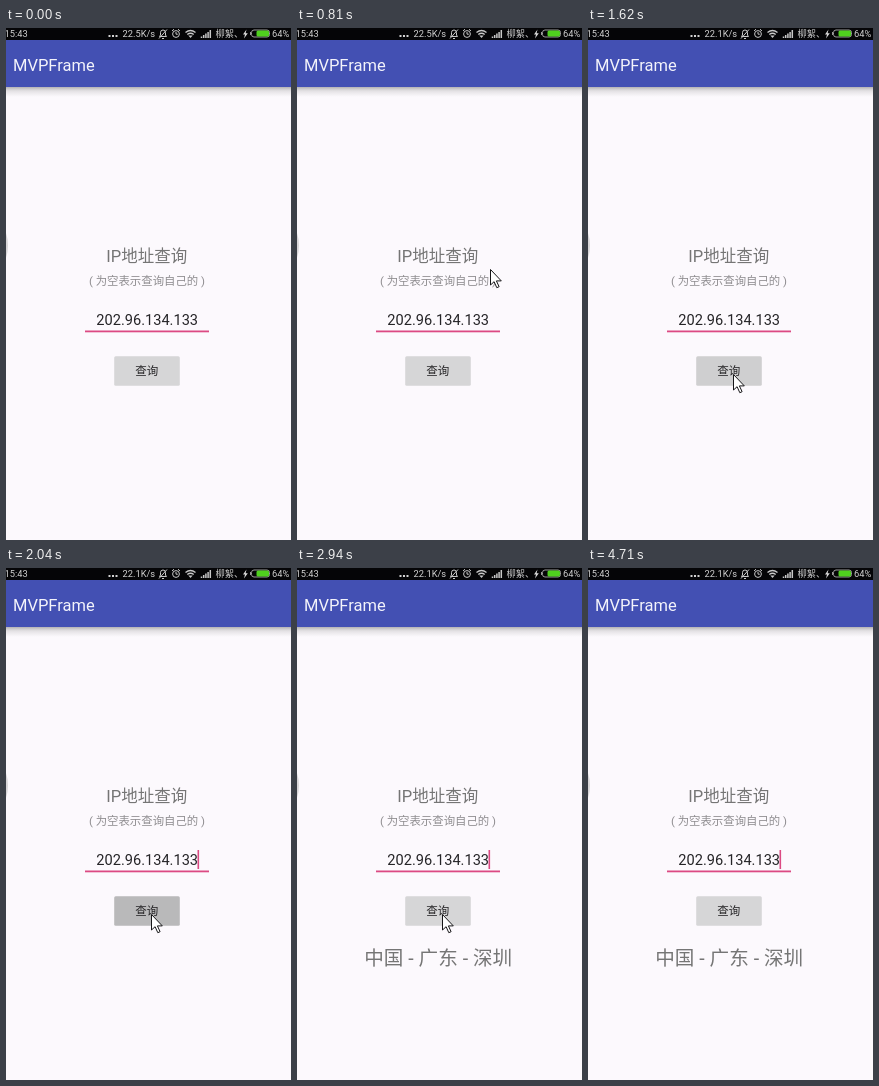
An HTML page for the animation above (4740 ms loop, 285 by 512 pixels).

```html
<!DOCTYPE html>
<html lang="zh-CN">
<head>
<meta charset="utf-8">
<style>
html, body { margin: 0; width: 100%; height: 100%; overflow: hidden; background: #fcf9fd; }
svg { display: block; width: 285px; height: 512px; }
text { font-family: Roboto, "Noto Sans CJK SC", "Noto Sans CJK", sans-serif; white-space: pre; }
.status text { font-size: 9.3px; fill: #d2d2d2; }
.line { fill: none; stroke: #c8c8c8; stroke-width: 1; }
.mid { text-anchor: middle; fill: #757575; }
</style>
</head>
<body>
<svg viewBox="0 0 285 512">
  <defs>
    <linearGradient id="shade" x2="0" y2="1">
      <stop offset="0" stop-color="#777" stop-opacity=".55"/>
      <stop offset=".4" stop-color="#999" stop-opacity=".25"/>
      <stop offset="1" stop-color="#aaa" stop-opacity="0"/>
    </linearGradient>
  </defs>
  <rect width="285" height="512" fill="#fcf9fd"/>
  <rect y="59" width="285" height="10" fill="url(#shade)"/>
  <rect y="12" width="285" height="47" fill="#4350b3"/>
  <rect width="285" height="12" fill="#050507"/>

  <g class="status">
    <text x="-1.5" y="9">15:43</text>
    <path d="M102.500 8h2m1.500 0h2m1.500 0h2" stroke="#d2d2d2" stroke-width="1.800"/>
    <text id="speed" x="116.500" y="9"></text>
    <g class="line">
      <path d="M153.500 8.500h7l-1-1.500V4.500a2.500 2.500 0 0 0-5 0V7zM156 10.500h2M161 1.500l-8 9"/>
      <circle cx="170" cy="6" r="3.400"/>
      <path d="M170 4v2.200h1.800M166 3l2-1.800M174 3l-2-1.800"/>
      <path d="M179.500 4.500q5-4 10 0M181.300 6.500q3.200-2.500 6.400 0" stroke-width="1.400"/>
      <path d="M195.500 10V8.500m2.200 1.500V7m2.200 3V5.500m2.200 4.500V4m2.200 6V2" stroke-width="1.500"/>
      <rect x="245.500" y="2" width="18" height="7" rx="2.500" stroke="#999"/>
    </g>
    <path d="M182.300 7.500h4.400L184.500 10z" fill="#c8c8c8"/>
    <text x="209.500" y="9" font-weight="500">柳絮、</text>
    <path d="M240.500 1.500L237 6.500h2l-1 4 3.800-5.300h-2.200z" fill="#ddd"/>
    <rect x="250.500" y="2.500" width="12.500" height="6" rx="1.500" fill="#4fd01e"/>
    <path d="M244.500 4v3" stroke="#999"/>
    <text x="266" y="9">64%</text>
  </g>

  <text x="7" y="42.500" font-size="16.500" fill="#f3f3fb">MVPFrame</text>
  <ellipse cx="-4.500" cy="217.500" rx="6.500" ry="17" fill="#d8d6d9"/>

  <text class="mid" x="140.700" y="233.500" font-size="16.500">IP地址查询</text>
  <text class="mid" x="141" y="257" font-size="11.400" style="fill:#8f8d90">( 为空表示查询自己的 )</text>
  <text x="90.300" y="297.300" font-size="14.600" fill="#252427">202.96.134.133</text>
  <rect x="79" y="302.500" width="124" height="1.800" fill="#dc4a83"/>
  <rect id="caret" x="191.500" y="282" width="1.600" height="19" fill="#dc4a83"/>

  <rect id="button" x="108.200" y="328.300" width="65.600" height="29.400" rx="1.500"/>
  <text class="mid" x="140.800" y="347" font-size="11.500" font-weight="500" style="fill:#262527">查询</text>

  <circle id="ring" cx="141" cy="189" r="13.500" fill="none" stroke="#ff4081" stroke-width="3"/>
  <text id="result" class="mid" x="141.200" y="397" font-size="19.600">中国 - 广东 - 深圳</text>
  <path id="mouse" d="M.5.500V16l3.600-3.300 2.700 6 2.300-1-2.700-5.800h4.900z" fill="#fff" stroke="#161618"/>
</svg>
<script>
const LOOP = 4740, STEP = 30, BLINK = 453, BLINK_START = 180;
const $ = id => document.getElementById(id);
const [speed, caret, button, ring, result, mouse] =
  ["speed", "caret", "button", "ring", "result", "mouse"].map($);

// time, x, y of the pointer: in from the right, down to the button, out again
const stops = [
  [600, 282, 38], [750, 196, 219], [810, 193, 241], [1080, 158, 336],
  [1230, 145, 346], [3540, 145, 346], [3690, 274, 186], [3780, 286, 140]
];

const ramp = (t, from, to) => Math.min(1, Math.max(0, (t - from) / (to - from)));
const show = (el, on) => el.setAttribute("visibility", on ? "visible" : "hidden");

function moveMouse(t) {
  const i = stops.findIndex(s => s[0] > t);
  show(mouse, i > 0);
  if (i < 1) return;
  const [t0, x0, y0] = stops[i - 1], [t1, x1, y1] = stops[i];
  const k = ramp(t, t0, t1);
  mouse.setAttribute("transform", `translate(${x0 + (x1 - x0) * k} ${y0 + (y1 - y0) * k})`);
}

function draw(now) {
  const t = Math.floor(now % LOOP / STEP) * STEP;
  speed.textContent = t < 1170 ? "22.5K/s" : "22.1K/s";
  show(caret, t >= BLINK_START && Math.floor((t - BLINK_START) / BLINK) % 2 === 0);

  const press = ramp(t, 1590, 1710) - ramp(t, 2160, 2400);
  const grey = Math.round(214 - 29 * press);
  button.setAttribute("fill", `rgb(${grey},${grey},${grey + 1})`);

  const wait = t - 2190;
  show(ring, wait >= 0 && wait < 180);
  ring.setAttribute("stroke-dasharray", `${8 + Math.max(0, wait) * 0.2} 100`);
  ring.setAttribute("transform", `rotate(${wait * 0.5 - 90} 141 189)`);
  show(result, wait >= 180);

  moveMouse(t);
}

const start = performance.now();
function tick() {
  draw(performance.now() - start);
  requestAnimationFrame(tick);
}
tick();
</script>
</body>
</html>
```
